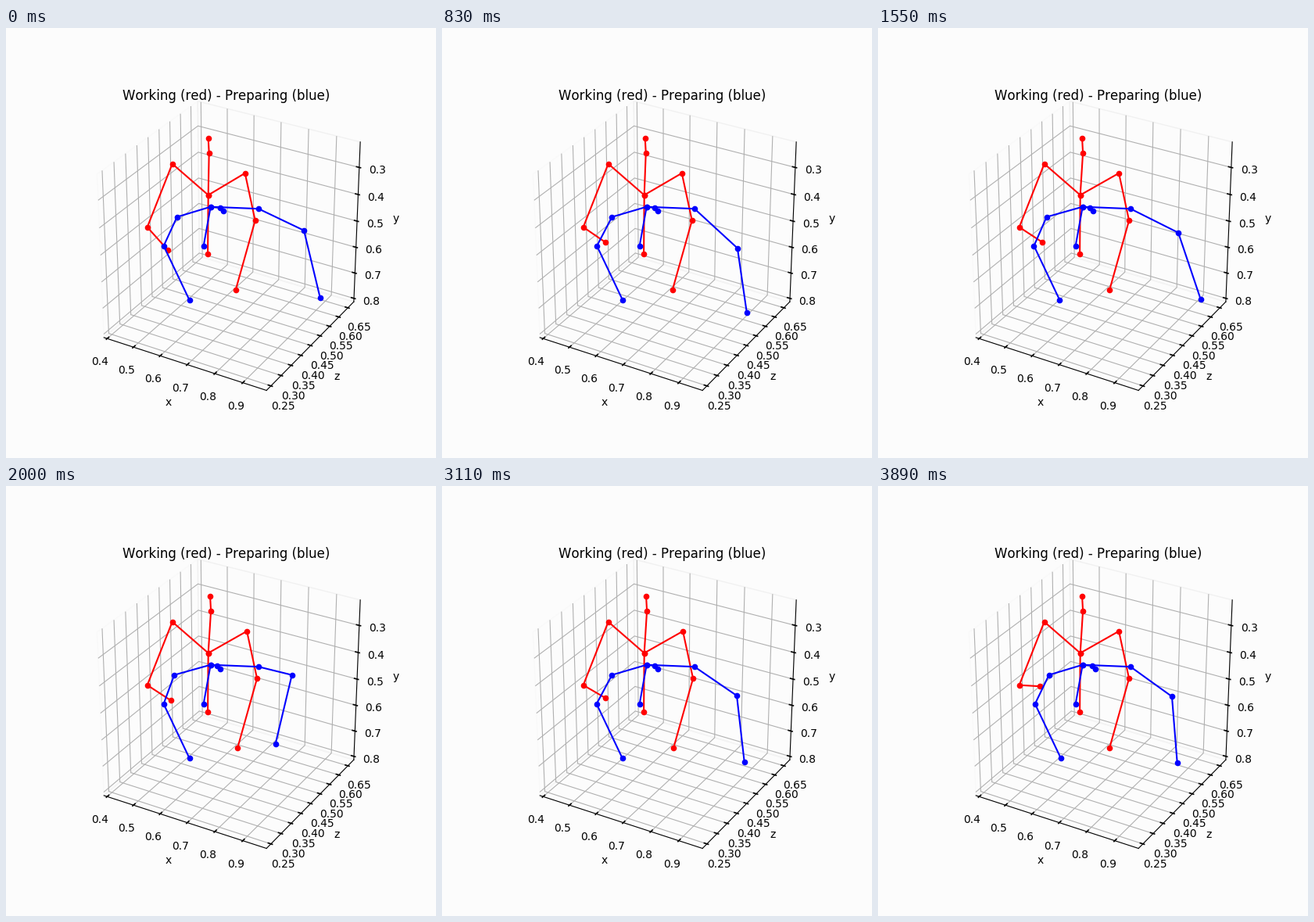
Recreate the animation shown at these times as a matplotlib script. Size 550 by 550 pixels, loop 3.92 s.

```python
import numpy as np
import matplotlib.pyplot as plt
from matplotlib.animation import FuncAnimation

plt.rcParams["text.kerning_factor"] = 6

SIZE, DPI = 550, 100
LOOP, STEP = 3920, 20
BACK = "#fcfcfc"

EDGE = 0.5 + 1 / 48        # half width of the box, in units of the axis range
TICK_IN, TICK_OUT = 0.2 / 12, 0.1 / 12
TICK_PAD, LABEL_PAD = 0.0752, 0.1634

X_LIM, Z_LIM, Y_LIM = (0.3996, 0.9716), (0.2376, 0.6741), (0.8014, 0.2196)

# Resting joints in pixels
RED = {
    "head": (259, 141.5), "chin": (260, 160), "neck": (259, 214), "hip": (258.4, 289),
    "l_shoulder": (213, 174), "l_elbow": (181, 255), "l_wrist": (207, 284),
    "r_shoulder": (306, 186), "r_elbow": (319, 246.5), "r_wrist": (294, 335.5),
}
BLUE = {
    "head": (278, 234.5), "chin": (274, 230), "neck": (262, 229), "hip": (253, 279),
    "l_shoulder": (219, 242), "l_elbow": (202, 279), "l_wrist": (235, 348.5),
    "r_shoulder": (323.3, 231.5),
}
# Turning points of the swinging hand: time, x, y
SWING = np.array([
    (0, 402, 345), (70, 423, 346), (150, 391, 345), (500, 377, 344),
    (840, 391, 366), (990, 415, 350), (1100, 397, 343), (1500, 419, 349),
    (2000, 345, 330), (2420, 344, 335), (2760, 403, 354), (3100, 387, 353),
    (3880, 383, 354),
])
CHAINS = [
    ["head", "chin", "neck", "hip"],
    ["l_wrist", "l_elbow", "l_shoulder", "neck", "r_shoulder", "r_elbow", "r_wrist"],
]


def project(points):
    """Perspective view (azimuth -60, elevation 30, distance 10) to pixels."""
    p = np.atleast_2d(points)
    azim, elev = np.radians(-60), np.radians(30)
    toward = np.array([np.cos(azim) * np.cos(elev), np.sin(azim) * np.cos(elev), np.sin(elev)])
    right = np.array([-np.sin(azim), np.cos(azim), 0])
    up = np.cross(toward, right)
    depth = 10 - p @ toward
    px = 0.125 + (p @ right / depth + 0.095) / 0.185 * 0.775
    py = 0.11 + (p @ up / depth + 0.095) / 0.185 * 0.77
    return SIZE * px, SIZE * (1 - py)


def scale(value, limits):
    return (value - limits[0]) / (limits[1] - limits[0]) - 0.5


fig = plt.figure(figsize=(SIZE / DPI, SIZE / DPI), dpi=DPI, facecolor=BACK)
ax = fig.add_axes([0, 0, 1, 1])
ax.set(xlim=(0, SIZE), ylim=(SIZE, 0))
ax.axis("off")


def stroke(points, color, width, order, cap="butt"):
    ax.plot(*project(points), color=color, lw=width, zorder=order, solid_capstyle=cap)


def write(text, point, va):
    x, y = project(point)
    ax.text(x[0], y[0], text, fontsize=10, ha="center", va=va)


def draw_box():
    e = EDGE
    left = [(-e, -e, -e), (-e, e, -e), (-e, e, e), (-e, -e, e)]
    back = [(-e, e, -e), (e, e, -e), (e, e, e), (-e, e, e)]
    floor = [(-e, -e, -e), (e, -e, -e), (e, e, -e), (-e, e, -e)]
    for pane, shade in ((left, "#f9f9f9"), (back, "#f1f1f1"), (floor, "#f4f4f4")):
        stroke(pane + pane[:1], shade, 1, 1)
    for ends in (floor[:2], floor[1:3], back[1:3]):
        stroke(ends, "black", 0.8, 3, "projecting")


def draw_axis(name, ticks, limits, form, grid, mark):
    for value in ticks:
        s = scale(value, limits)
        stroke(grid(s), "#b0b0b0", 0.8, 2)
        stroke([mark(s, -TICK_IN, 0), mark(s, TICK_OUT, 0)], "black", 1.2, 3, "projecting")
        write(form % value, mark(s, TICK_PAD, TICK_PAD), "top")
    write(name, mark(0, LABEL_PAD, LABEL_PAD), "center")


E = EDGE
draw_box()
draw_axis("x", np.arange(4, 10) / 10, X_LIM, "%.1f",
          lambda s: [(s, -E, -E), (s, E, -E), (s, E, E)],
          lambda s, out, side: (s, -E - out, -E - side))
draw_axis("z", np.arange(5, 14) / 20, Z_LIM, "%.2f",
          lambda s: [(E, s, -E), (-E, s, -E), (-E, s, E)],
          lambda s, out, side: (E + out, s, -E - side))
draw_axis("y", np.arange(3, 9) / 10, Y_LIM, "%.1f",
          lambda s: [(-E, -E, s), (-E, E, s), (E, E, s)],
          lambda s, out, side: (E + out, E + side, s))
ax.text(281.9, 91.5, "Working (red) - Preparing (blue)", fontsize=12,
        ha="center", va="baseline")


def ease(t, start, end):
    u = np.clip((t - start) / (end - start), 0, 1)
    return u * u * (3 - 2 * u)


def shift(joints, names, dx, dy=0):
    for name in names.split():
        x, y = joints[name]
        joints[name] = (x + dx, y + dy)


def red_pose(t):
    joints = dict(RED)
    shift(joints, "head chin r_shoulder r_elbow r_wrist", 2.4 * ease(t, 500, 1200))
    lift = 9.5 * ease(t, 0, 500) + 3 * ease(t, 2420, 3100) + 15 * ease(t, 3100, 3880)
    shift(joints, "l_wrist", 4 * np.sin(np.pi * t / LOOP), -lift)
    return joints


def blue_pose(t):
    joints = dict(BLUE)
    shift(joints, "head chin l_shoulder", -3.5 * np.sin(np.pi * t / LOOP) ** 2)
    shift(joints, "l_elbow l_wrist", 2 * np.cos(2 * np.pi * t / 2100) - 2)
    x, y = (np.interp(t, SWING[:, 0], SWING[:, k]) for k in (1, 2))
    joints["r_wrist"] = (x, y)
    # The elbow follows the hand: less sideways, a little more up and down
    joints["r_elbow"] = (366 + 0.27 * (x - 345), 242 + 1.15 * (y - 330))
    return joints


def make_body(color):
    return [ax.plot([], [], color=color, marker="o", ms=5.5, mew=0, lw=1.5, zorder=5)[0]
            for _ in CHAINS]


def set_pose(lines, joints):
    for line, chain in zip(lines, CHAINS):
        line.set_data(*(np.array([joints[name] for name in chain]).T - 0.3))


red_body, blue_body = make_body("red"), make_body("blue")


def update(i):
    # The motion pauses briefly near the start
    t = np.interp(i * STEP, [0, 150, 310, 500, LOOP], [0, 150, 150, 500, LOOP])
    set_pose(red_body, red_pose(t))
    set_pose(blue_body, blue_pose(t))
    return red_body + blue_body


anim = FuncAnimation(fig, update, frames=LOOP // STEP, interval=STEP,
                     repeat=True, repeat_delay=0, blit=False)
plt.show()
```
